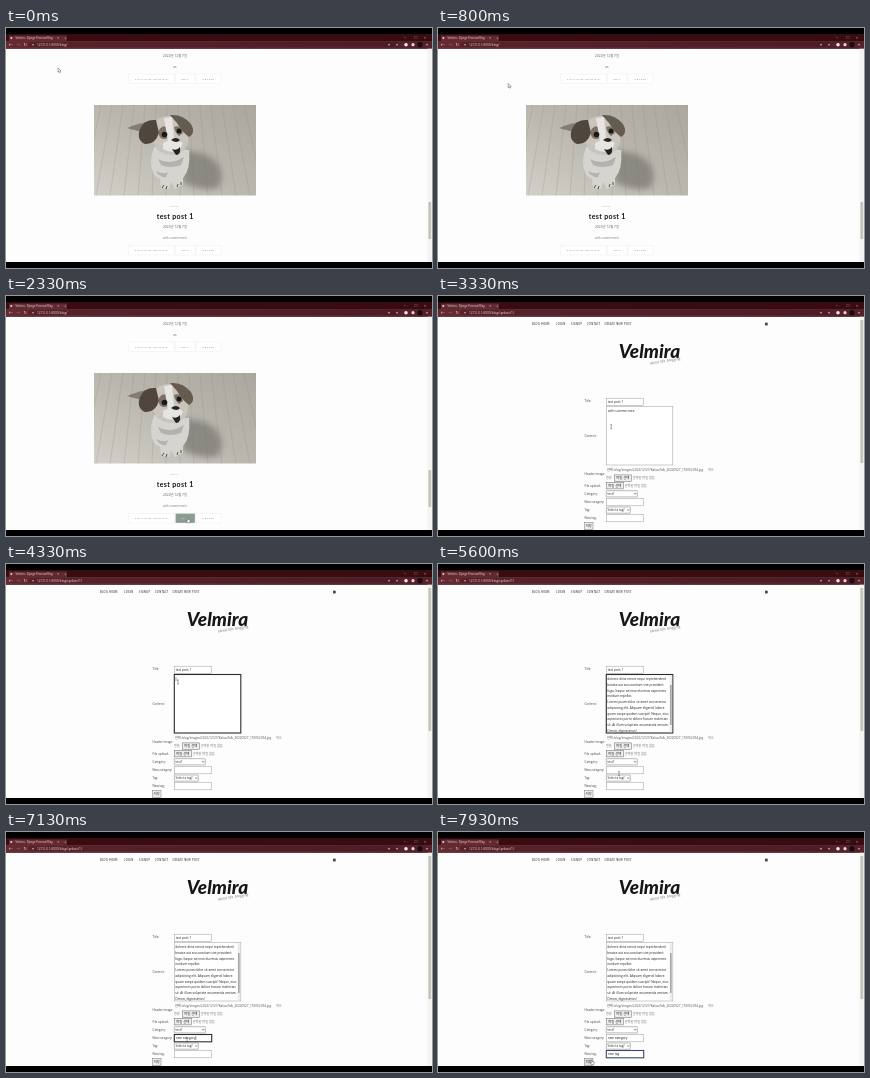
Write an HTML page that moves like this. It is 426 by 240 pixels and loops after 8000 ms.

```html
<!DOCTYPE html>
<html lang="en">
<head>
<meta charset="utf-8">
<title>Blog editing demo</title>
<style>
html, body { margin: 0; width: 100%; height: 100%; overflow: hidden; background: #000; }
svg { display: block; width: 100%; height: 100%; }
text { font-family: "Open Sans", "Noto Sans CJK KR", "Noto Sans CJK", sans-serif; white-space: pre; }
</style>
</head>
<body>
<svg id="stage" viewBox="0 0 426 240">
  <defs>
    <linearGradient id="floor" x1="0" y1="1" x2="1" y2="0">
      <stop offset="0" stop-color="#d3d0c9"/>
      <stop offset=".5" stop-color="#bab7ae"/>
      <stop offset="1" stop-color="#aaa79e"/>
    </linearGradient>
    <linearGradient id="bar" x1="0" x2="1">
      <stop offset="0" stop-color="#652a32"/>
      <stop offset="1" stop-color="#55222b"/>
    </linearGradient>
    <filter id="soft" x="-30%" y="-30%" width="160%" height="160%"><feGaussianBlur stdDeviation="3"/></filter>
    <filter id="fur" x="-10%" y="-10%" width="120%" height="120%"><feGaussianBlur stdDeviation=".7"/></filter>
    <clipPath id="photoClip"><path d="M88 77h162v90.5H88z"/></clipPath>
  </defs>
  <path fill="#fdfdfd" d="M0 20.5h426V234H0z"/>
  <g id="list">
    <g clip-path="url(#photoClip)">
      <path fill="url(#floor)" d="M88 77h162v91H88z"/>
      <g id="planks" stroke="#8f8b82" stroke-width=".5" opacity=".5"></g>
      <path fill="#77756f" opacity=".7" filter="url(#soft)" d="M178 124q20-2 32 10q10 14 2 26q-16 4-36-6z"/>
      <g filter="url(#fur)">
        <path fill="#5d554c" opacity=".6" d="M147 94Q134 94 121 100Q133 104 143 104z"/>
        <path fill="#d5d4cf" d="M148 119Q142 135 148 147L154 151L155 160L163 161L165 154L169 161L177 157L177 150Q185 141 183 122z"/>
        <path fill="#b4b2ac" d="M152 131q12 7 26-2l-3 8q-11 4-20 0zM150 143q8 4 12 1l-2 5q-6 1-10-6z"/>
        <path fill="#c9c5bd" d="M147 97Q152 88 163 88Q178 90 182 106Q184 121 171 127Q155 128 149 119Q143 107 147 97z"/>
        <path fill="#50463d" d="M150 92Q138 91 134 101Q130 112 139 116Q149 117 153 105z"/>
        <path fill="#665b50" d="M164 87Q177 86 185 96Q190 105 183 109Q176 104 171 95z"/>
        <path fill="#7c7164" d="M153 102q5-7 10-1l-1 9q-7 3-9-3zM168 99q7-3 9 6l-4 3q-4-3-5-9z"/>
        <path fill="#e6e5e1" d="M158 90L166 89L168 110L162 114zM157 115q10-7 20 0l-3 7q-9 4-17-1z"/>
        <path fill="#252323" d="M165 112q5-4 9 0q-3 4-9 0zM166 121q5 2 8-2q1 8-4 8z"/>
        <circle cx="158.5" cy="106.5" r="2.8" fill="#191919"/>
        <circle cx="173" cy="103" r="2.5" fill="#191919"/>
        <path fill="none" stroke="#55504b" d="M156 160l2-3M160 161l1-3M171 159l1-3M175 157l0-3"/>
      </g>
    </g>
  </g>
  <g id="form"></g>
  <g id="chrome">
    <path fill="#390c12" d="M0 6h426v7.5H0z"/>
    <path fill="url(#bar)" d="M3 7.5h58v6H3zM0 13h426v7.7H0z"/>
    <path fill="#321319" d="M25 14.1h365a2.5 2.5 0 0 1 0 5H25a2.5 2.5 0 0 1 0-5z" opacity=".3"/>
    <path fill="#f4f4f2" d="M421.5 20.7H426V234h-4.5z"/>
  </g>
</svg>
<script>
const LOOP = 8000;
const NS = "http://www.w3.org/2000/svg";
const $ = id => document.getElementById(id);
const list = $("list"), form = $("form"), chrome = $("chrome");

function add(parent, tag, attrs, content = "") {
  const node = document.createElementNS(NS, tag);
  for (const key in attrs) node.setAttribute(key, attrs[key]);
  node.textContent = content;
  parent.append(node);
  return node;
}
const label = (parent, x, y, content, size = 3, extra = {}) =>
  add(parent, "text", { x, y, "font-size": size, fill: "#444", ...extra }, content);
const box = (parent, x, y, width, height, extra = {}) =>
  add(parent, "rect", { x, y, width, height, fill: "#fff", stroke: "#999", "stroke-width": .5, ...extra });
const show = (node, on) => { node.style.display = on ? "" : "none"; };

// Browser frame
const light = { fill: "#e9dada" };
add(chrome, "circle", { cx: 5.3, cy: 10, r: 1.1, fill: "#d8cfcf" });
label(chrome, 9.5, 10.8, "Velmira - Django Personal Blog", 2.6, light);
label(chrome, 51, 11, "×", 4, light);
label(chrome, 58, 11, "+", 4, light);
label(chrome, 2.7, 18.3, "←", 4.2, light);
label(chrome, 10, 18.3, "→", 4.2, { fill: "#9b7777" });
label(chrome, 17.5, 18.3, "↻", 4.2, light);
add(chrome, "circle", { cx: 27, cy: 16.7, r: .8, fill: "#d4baba" });
const address = label(chrome, 31, 17.8, "", 3.2, light);
[[383, "#bca2a2", .9], [391, "#bca2a2", .9], [400, "#f1e9e9", 1.8],
 [407, "#e5d5d5", 1.6], [414, "#160b0e", 2.6], [421, "#d9c5c5", .8]]
  .forEach(([cx, fill, r]) => add(chrome, "circle", { cx, cy: 16.7, r, fill }));
["−", "□", "×"].forEach((sign, i) => label(chrome, 398 + i * 10, 10.8, sign, 3.5, light));
const thumb = box(chrome, 422.4, 174, 2.8, 37, { fill: "#c4c4bc", stroke: "none" });

// Blog list
for (let i = 0; i < 16; i++)
  add($("planks"), "line", { x1: 84 + i * 11, y1: 77, x2: 62 + i * 14, y2: 168 });
const centered = { "text-anchor": "middle" };
const date = y => label(list, 169, y, "2022년 12월 7일", 3.3, { ...centered, fill: "#606068" });
function buttons(y) {
  return [["CONTINUE READING", 123, 45], ["EDIT", 169.5, 19.5], ["DELETE", 190, 25]].map(([name, x, width]) => {
    const rect = box(list, x, y, width, 9.5, { stroke: "#e6e6e6", "stroke-width": .35 });
    const text = label(list, x + width / 2, y + 5.8, name, 2.4, { ...centered, "letter-spacing": .65, fill: "#6c6c74" });
    return { rect, text };
  });
}
date(29);
label(list, 169, 40, "as", 3.2, { ...centered, fill: "#606068" });
buttons(46);
label(list, 169, 179, "TEST1", 2.5, { ...centered, "letter-spacing": .5, fill: "#999" });
label(list, 169.3, 190.5, "test post 1", 7, { ...centered, "font-weight": 700, "letter-spacing": .35, fill: "#151515", style: "font-family:Lato,sans-serif" });
date(200.4);
label(list, 169, 211, "with summernote", 2.9, { ...centered, fill: "#7c7888" });
const editButton = buttons(217.5)[1];

// Editing form
[[94, "BLOG HOME"], [118, "LOGIN"], [133, "SIGNUP"], [149, "CONTACT"], [166.5, "CREATE NEW POST"]]
  .forEach(([x, name]) => label(form, x, 29, name, 2.5, { "letter-spacing": .33, "font-weight": 600 }));
box(form, 327, 26.7, 2.7, 2.7, { fill: "#444", stroke: "none" });
label(form, 211.5, 61.5, "Velmira", 19, { ...centered, fill: "#171717", "font-weight": 800, "font-style": "italic", style: "font-family:Lato,sans-serif" });
label(form, 212, 68.5, "about life, blogging", 3.7, { fill: "#777", "font-style": "italic", transform: "rotate(-9 212 68.5)" });

[[106, "Title:"], [140.5, "Content:"], [179.3, "Header image:"], [190.6, "File upload:"],
 [198.6, "Category:"], [206.6, "New category:"], [214.7, "Tag:"], [222.6, "New tag:"]]
  .forEach(([y, name]) => label(form, 146.5, y, name, 3));
function field(y, value = "") {
  return { rect: box(form, 168.3, y, 37.4, 7.3), text: label(form, 169.7, y + 4.7, value, 3.2, { fill: "#222" }) };
}
field(102.2, "test post 1");
const area = box(form, 168.3, 110.5, 66.5, 58.5);
const oldText = label(form, 170, 116.2, "with summernote", 3.2, { fill: "#222" });
const pasted = add(form, "g", {});
const paragraph = `dolores dicta omnis sequi reprehenderit
beatae aut accusantium sint provident
fuga. Itaque ad esse ducimus asperiores
incidunt repellat.
Lorem ipsum dolor sit amet consectetur
adipisicing elit. Aliquam eligendi labore
quam saepe quidem suscipit! Neque, eius
asperiores porro dolore harum molestias
sit. At illum voluptate assumenda veniam.
Omnis, dignissimos!`.split("\n");
paragraph.forEach((line, i) => label(pasted, 169.3, 116 + i * 5.75, line, 3.17, { fill: "#222" }));
box(pasted, 231.5, 111.2, 2.7, 57, { fill: "#eee", stroke: "none" });
box(pasted, 232, 121, 1.7, 40, { fill: "#aaa", stroke: "none" });

label(form, 169, 175.2, "현재: blog/images/2022/12/27/KakaoTalk_20220927_155052094.jpg", 3.1, { fill: "#555" });
label(form, 270, 175.2, "취소", 3, { fill: "#777" });
label(form, 168, 183.3, "변경:", 3, { fill: "#777" });
function picker(x, y) {
  box(form, x, y, 17, 6.4, { fill: "#eee", stroke: "#666" });
  label(form, x + 8.5, y + 4.3, "파일 선택", 3.3, { ...centered, fill: "#222" });
  label(form, x + 18.3, y + 4.3, "선택된 파일 없음", 3.2, { fill: "#777" });
}
picker(176.3, 178.9);
picker(168.3, 186.5);
function dropdown(y, width, value) {
  box(form, 168.3, y, width, 6.2, { stroke: "#777", rx: .4 });
  label(form, 169.5, y + 4.2, value, 3, { fill: "#222" });
  add(form, "path", { d: `M${165.2 + width} ${y + 2.4}l1 1.2l1-1.2`, fill: "none", stroke: "#333", "stroke-width": .6 });
}
dropdown(194.7, 31, "test1");
const category = field(202.5);
dropdown(211, 24, "Select a tag?");
const tag = field(218.5);
const save = box(form, 146.5, 226.6, 8.5, 6.8, { fill: "#eee", stroke: "#777" });
label(form, 150.8, 231.2, "저장", 3.2, { ...centered, fill: "#222" });
const caret = add(form, "path", { stroke: "#222", "stroke-width": .45 });

// Pointer shapes
const pointer = add($("stage"), "g", {});
const cursorPath = (d, fill) => add(pointer, "path", { d, fill, stroke: "#555", "stroke-width": .5 });
const arrow = cursorPath("M-1-2V2.2L0 1.4L.7 2.8L1.4 2.4L.8 1H2z", "#fff");
const hand = cursorPath("M-.8-2v3L-1.8.6L-.3 2.8H1.8L2.2 0L.1-.4V-2z", "#fff");
const beam = cursorPath("M-1-2H1M0-2V2M-1 2H1", "none");

const route = [
  [0, 53, 42], [650, 53, 42], [1450, 247, 207], [1800, 247, 207],
  [2230, 182, 224], [2900, 182, 224], [3450, 172, 118], [4850, 172, 118],
  [5450, 181, 210], [6000, 181, 208], [7450, 181, 208], [7850, 154, 230], [8000, 154, 230]
];
function pointerAt(t) {
  const i = Math.max(1, route.findIndex(step => step[0] > t));
  const [start, x, y] = route[i - 1], [end, toX, toY] = route[i];
  const p = (t - start) / (end - start), ease = p * p * (3 - 2 * p);
  return [x + (toX - x) * ease, y + (toY - y) * ease];
}
const typed = (value, start, end, t) =>
  value.slice(0, Math.floor(value.length * Math.max(0, Math.min(1, (t - start) / (end - start)))));
function focus(rect, on, color = "#292b35") {
  rect.setAttribute("stroke", on ? color : "#999");
  rect.setAttribute("stroke-width", on ? 1.1 : .5);
}

function render(t) {
  const editing = t >= 2700;
  show(list, !editing);
  show(form, editing);
  address.textContent = "127.0.0.1:8000/blog/" + (editing ? "update/1/" : "");
  thumb.setAttribute("y", editing ? 24 : 174);
  thumb.setAttribute("height", editing ? 143 : 37);

  const hover = t > 2130 && !editing;
  editButton.rect.setAttribute("fill", hover ? "#8b9d91" : "#fff");
  editButton.text.setAttribute("fill", hover ? "#fff" : "#6c6c74");

  const areaFocus = t >= 3500 && t < 6050, tagFocus = t >= 7150;
  const categoryFocus = t >= 6050 && !tagFocus;
  focus(area, areaFocus);
  focus(category.rect, categoryFocus);
  focus(tag.rect, tagFocus, "#39496b");
  show(oldText, t < 3800);
  show(pasted, t >= 4750);
  category.text.textContent = typed("new category", 6500, 7030, t);
  tag.text.textContent = typed("new tag", 7230, 7600, t);
  save.setAttribute("fill", t > 7800 ? "#ddd" : "#eee");

  const active = categoryFocus ? category : tagFocus ? tag : null;
  const caretX = active ? 170 + active.text.getComputedTextLength() : t >= 4750 ? 198.5 : 170;
  const caretY = categoryFocus ? 204 : tagFocus ? 220 : t >= 4750 ? 164.5 : 113;
  caret.setAttribute("d", `M${caretX} ${caretY}v4`);
  show(caret, (areaFocus || active) && t % 1000 < 500);

  const [x, y] = pointerAt(t);
  pointer.setAttribute("transform", `translate(${x} ${y})`);
  const overArea = editing && x > 168 && x < 235 && y > 110 && y < 169;
  const overField = editing && x > 168 && x < 206 && y > 202 && y < 211;
  const overButton = hover || (editing && x < 156 && y > 226);
  show(beam, overArea || overField);
  show(hand, overButton);
  show(arrow, !overArea && !overField && !overButton);
}
function tick() {
  render(performance.now() % LOOP);
  requestAnimationFrame(tick);
}
tick();
</script>
</body>
</html>
```
